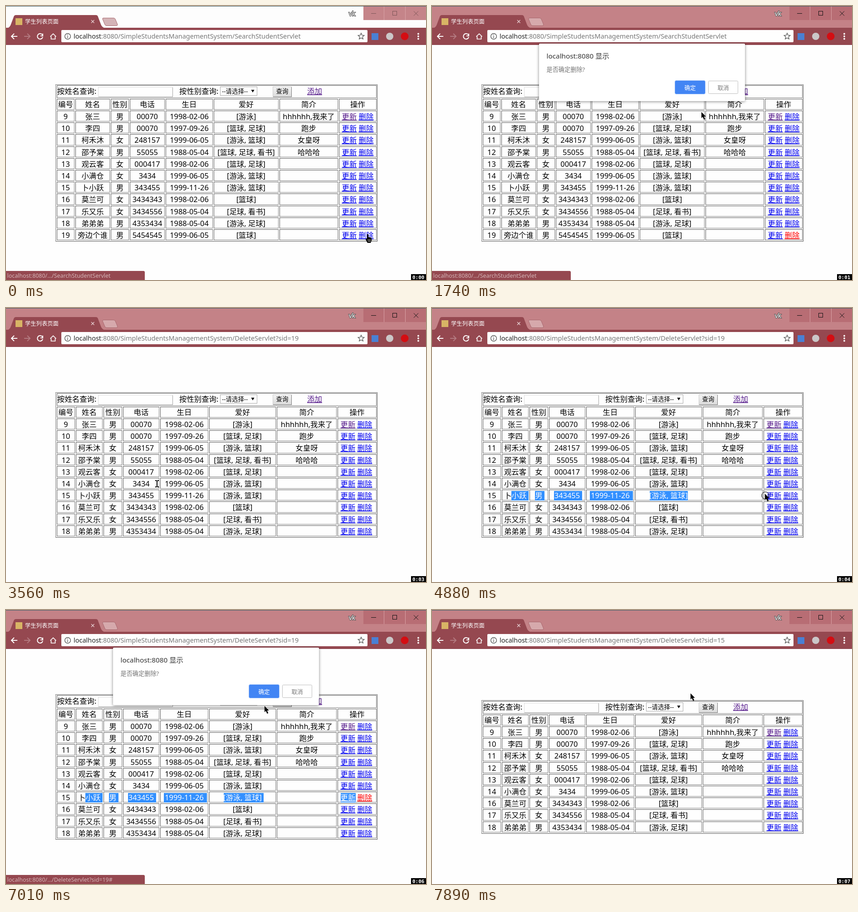
An HTML page for the animation above (8000 ms loop, 926x605 px).

```html
<!DOCTYPE html>
<html lang="zh-CN">
<head>
<meta charset="utf-8">
<title>学生列表页面</title>
<style>
html, body { margin: 0; width: 100%; height: 100%; overflow: hidden; background: #fefefe; }
svg { display: block; width: 926px; height: 605px; font: 16.4px "Noto Sans", "Noto Sans CJK SC", sans-serif; }
text { white-space: pre; }
.mid { text-anchor: middle; }
.link { fill: #00e; text-decoration: underline; }
.link.visited { fill: #551a8b; }
.link.active { fill: #f00; }
.crisp { shape-rendering: crispEdges; }
.icon { fill: none; stroke: #fff; stroke-width: 2; }
.small { font-size: 13.4px; }
.tab { font-size: 12.3px; fill: #fff; }
.url { font-size: 14.46px; fill: #777; }
.timer { font: bold 11px "DejaVu Sans Mono", monospace; fill: #fff; }
#dialog { filter: drop-shadow(0 1px 3px #0007); }
</style>
</head>
<body>
<svg viewBox="0 0 926 605">
  <defs>
    <linearGradient id="fade" gradientUnits="userSpaceOnUse" x1="158" x2="179">
      <stop stop-color="#fff"/><stop offset="1" stop-color="#fff" stop-opacity="0"/>
    </linearGradient>
    <linearGradient id="button" x2="0" y2="1">
      <stop stop-color="#f4f4f4"/><stop offset="1" stop-color="#dadada"/>
    </linearGradient>
    <clipPath id="dragged"><rect id="dragArea" x="175" y="400" width="0" height="30"/></clipPath>
  </defs>

  <rect width="926" height="605" fill="#fefefe"/>
  <g id="tables"></g>
  <g id="selection"></g>

  <!-- window frame -->
  <rect id="titlebar" width="926" height="48"/>
  <rect id="controls" x="788" y="1" width="138" height="30"/>
  <path d="M833.5 1V31M880.5 1V31" stroke="#d9a3a7" class="crisp"/>
  <rect width="926" height="1" fill="#40606a"/>
  <g id="controlIcons" fill="none" class="crisp">
    <path d="M805 16.5h11M852.5 11.5h9v9h-9z"/>
    <path d="M899 11.5l10 10M909 11.5l-10 10" shape-rendering="auto"/>
  </g>
  <text x="763" y="22" class="mid" font-size="14" fill="#fff" stroke="#555" stroke-width="2" paint-order="stroke">vk</text>
  <path d="M5 48Q9 46 11 40L17 24Q18 20 22 20H198Q202 20 203 24L209 40Q211 46 216 48V49H5z" fill="#954850"/>
  <path id="newTab" d="M215 26.5H237Q240 26.5 241 29L246 41Q246 43.500 243 43.500H222Q219 43.500 218 41L213 29Q212 26.500 215 26.500z" stroke="#a8686e"/>
  <rect y="48" width="926" height="38" fill="#954850"/>
  <rect y="85" width="926" height="1" fill="#87404a"/>
  <g id="tabReady">
    <rect x="21" y="27" width="15" height="15" fill="#d8b465"/>
    <text x="42" y="38.500" class="tab">学生列表页面</text>
    <path d="M80 63.500a6 6 0 1 0 1 5M81 61v5h-5" class="icon"/>
  </g>
  <g id="tabLoading">
    <path d="M29 30q1.500-1.500 4-1.500" class="icon"/>
    <text x="43" y="38.500" class="tab" fill="url(#fade)" style="fill:url(#fade)">localhost:8080/SimpleS</text>
    <path d="M69.500 61.500l11 11M80.500 61.500l-11 11" class="icon"/>
  </g>
  <path d="M188 31l6.500 6.500M194.500 31l-6.500 6.500" stroke="#e8d3d5" stroke-width="1.300"/>
  <path d="M25 67H12M18 61l-6 6 6 6" class="icon"/>
  <path d="M40 67H53M47 61l6 6-6 6" class="icon" style="stroke:#b37a80"/>
  <path d="M97.500 67.500L104 61.500l6.500 6M99.500 67v6h9v-6" class="icon" style="stroke-width:1.700"/>
  <rect x="122" y="53" width="675" height="27" rx="2" fill="#fefefe"/>
  <circle cx="136" cy="67" r="6.300" fill="none" stroke="#555" stroke-width="1.400"/>
  <path d="M136 63.500v1.500M136 66.500v4" stroke="#555" stroke-width="1.500"/>
  <text x="149" y="72" class="url"><tspan fill="#222">localhost</tspan><tspan id="urlPath"></tspan></text>
  <path d="M783 60l1.900 4.500 4.900.4-3.700 3.200 1.100 4.800-4.200-2.500-4.200 2.500 1.100-4.800-3.700-3.200 4.900-.4z" fill="none" stroke="#555" stroke-width="1.300"/>
  <rect x="806" y="60" width="15" height="15" fill="#4a80d4"/>
  <circle cx="846" cy="67" r="8" fill="#cbc7c8"/>
  <circle cx="879" cy="67" r="8.500" fill="#d40d12"/>
  <g fill="#fff"><circle cx="909" cy="61.500" r="1.900"/><circle cx="909" cy="67" r="1.900"/><circle cx="909" cy="72.500" r="1.900"/></g>

  <g id="dialog">
    <rect x="236" y="83" width="454" height="127" rx="2" fill="#fff"/>
    <text x="252.500" y="116" font-size="15.300" fill="#333">localhost:8080 显示</text>
    <text x="252.500" y="144.500" font-size="13.200" fill="#757575">是否确定删除?</text>
    <rect x="535.500" y="164.500" width="67" height="30" rx="3" fill="#4285f4" stroke="#a9c8fa"/>
    <rect x="609.500" y="165.500" width="65" height="28" rx="2" fill="#fff" stroke="#bdbdbd"/>
    <text x="569" y="185" class="mid" font-size="12.600" fill="#fff">确定</text>
    <text x="642" y="185" class="mid" font-size="12.600" fill="#757575">取消</text>
  </g>

  <g id="status">
    <path d="M0 585H303Q306 585 306 588V605H0z" fill="#954850"/>
    <text id="statusText" x="2.500" y="600" font-size="12.400" fill="#d6b5b8"></text>
  </g>

  <g id="pointer">
    <circle id="ring" cx="1" cy="4" r="8" fill="none" stroke="#000"/>
    <path id="arrow" d="M0 0V13.500L3 10.700 5.700 17 8.300 15.800 5.600 9.900H9.700z"/>
    <path id="beam" d="M-4-7H-1M1-7H4M0-7V7M-4 7H-1M1 7H4" stroke="#000" stroke-width="2"/>
    <g id="hand">
      <path d="M-1 0H2V6L9 8V14L7 19H0L-4 12-3 9-1 10z"/>
      <path d="M0 12.500H7M1 15.500H7" stroke="#ddd"/>
    </g>
  </g>
  <rect x="893" y="592" width="33" height="13"/>
  <text id="timer" x="896" y="602.500" class="timer"></text>
</svg>

<script>
const LOOP = 8000;
const $ = id => document.getElementById(id);
const show = (id, on) => $(id).style.display = on ? '' : 'none';

const students = [
  [9, '张三', '男', '00070', '1998-02-06', '[游泳]', 'hhhhhh,我来了'],
  [10, '李四', '男', '00070', '1997-09-26', '[篮球, 足球]', '跑步'],
  [11, '柯禾沐', '女', '248157', '1999-06-05', '[游泳, 篮球]', '女皇呀'],
  [12, '邵予棠', '男', '55055', '1988-05-04', '[篮球, 足球, 看书]', '哈哈哈'],
  [13, '观云客', '女', '000417', '1998-02-06', '[篮球, 足球]', ''],
  [14, '小满仓', '女', '3434', '1999-06-05', '[游泳, 篮球]', ''],
  [15, '卜小跃', '男', '343455', '1999-11-26', '[游泳, 篮球]', ''],
  [16, '莫兰可', '女', '3434343', '1998-02-06', '[篮球]', ''],
  [17, '乐又乐', '女', '3434556', '1988-05-04', '[足球, 看书]', ''],
  [18, '弟弟弟', '男', '4353434', '1988-05-04', '[游泳, 足球]', ''],
  [19, '旁边个谁', '男', '5454545', '1999-06-05', '[篮球]', '']
];
const headings = ['编号', '姓名', '性别', '电话', '生日', '爱好', '简介', '操作'];
const wideColumns = [112, 153, 231, 273, 352, 458, 603, 734, 819];
const slimColumns = [112, 154, 215, 258, 340, 448, 597, 731, 819];

const text = (x, y, s, attrs = '') => `<text x="${x}" y="${y}" ${attrs}>${s}</text>`;
const centred = (x, y, s) => text(x, y, s, 'class="mid"');

// Bevelled outline with its top-left and bottom-right sides in two greys.
function bevel(l, t, r, b, light, dark) {
  return `<g class="crisp" fill="none"><path d="M${l + .5} ${b}V${t + .5}H${r}" stroke="${light}"/>
    <path d="M${l + 1} ${b - .5}H${r - .5}V${t + 1}" stroke="${dark}"/></g>`;
}
const cell = (l, t, r, b) => bevel(l, t, r, b, '#555', '#808080');

function searchRow(top) {
  const base = top + 21;
  return cell(112, top + 2, 817, top + 30)
    + text(113, base, '按姓名查询:') + text(382, base, '按性别查询:')
    + bevel(203, top + 6, 368, top + 28, '#ddd', '#a0a0a0')
    + bevel(472, top + 5, 554, top + 25, '#a9a9a9', '#a9a9a9')
    + text(476, base - 1, '--请选择--', 'class="small"')
    + `<path d="M540.500 ${top + 12}h7l-3.500 6z"/>`
    + `<rect x="588" y="${top + 5}" width="42" height="23" fill="url(#button)"/>`
    + bevel(588, top + 5, 630, top + 28, '#ccc', '#777')
    + text(595.5, base - 1, '查询', 'class="small"')
    + text(664, base, '添加', 'class="link visited"');
}

function table(id, top, columns, rows) {
  const middle = i => (columns[i] + columns[i + 1] - 2) / 2;
  const rowTop = i => Math.round(top + 58 + 26.2 * i);
  const cells = (t, b) => columns.slice(0, -1).map((l, i) => cell(l, t, columns[i + 1] - 2, b)).join('');
  let out = bevel(109, top, 819, rowTop(rows.length) + 1, '#808080', '#555') + searchRow(top)
    + cells(top + 32, top + 56) + headings.map((h, i) => centred(middle(i), top + 50, h)).join('');
  rows.forEach((row, i) => {
    const base = top + 77 + 26.2 * i, x = columns[7] + 6.5;
    out += cells(rowTop(i), rowTop(i + 1) - 2)
      + row.map((s, c) => centred(middle(c), base, s)).join('')
      + text(x, base, '更新', `class="link ${i ? '' : 'visited'}"`)
      + text(x + 37, base, '删除', `class="link" id="${id}-${row[0]}"`);
  });
  return `<g id="${id}">${out}</g>`;
}

const without = (...ids) => students.filter(s => !ids.includes(s[0]));
$('tables').innerHTML = table('full', 173, wideColumns, students)
  + table('shorter', 186, slimColumns, without(19))
  + table('shortest', 199, slimColumns, without(15, 19));

const mark = (l, r) => `<rect x="${l}" y="404" width="${r - l}" height="21" fill="#3390ff"/>`;
const base15 = 420.2;
$('selection').innerHTML = `<g clip-path="url(#dragged)" fill="#fff">
  ${mark(175, 213)}${mark(227, 248)}${mark(269, 331)}${mark(348, 443)}${mark(480, 564)}
  ${text(175.6, base15, '小跃')}${centred(235.5, base15, '男')}${centred(298, base15, '343455')}
  ${centred(393, base15, '1999-11-26')}${centred(521.5, base15, '[游泳, 篮球]')}</g>
  <g id="selectedEnd">${mark(564, 568)}${mark(738, 771)}
  ${text(737.5, base15, '更新', 'class="link" style="fill:#fff"')}</g>`;

const bursts = [[530, 1470, 8], [1590, 2530, 8], [2650, 3560, 8], [3710, 4610, 8],
  [4760, 5520, 7], [5800, 6740, 8], [6860, 7890, 9]];
const ticks = [0, ...bursts.flatMap(([a, b, n]) =>
  Array.from({ length: n }, (_, k) => a + Math.floor((b - a) * k / (n - 1) / 10) * 10))];

// [time, x, y]
const route = [[0, 797, 504], [940, 797, 504], [1860, 557, 185], [2650, 557, 185], [3560, 333, 388],
  [4110, 176, 414], [4240, 176, 414], [4490, 320, 414], [4880, 734, 410], [5010, 765, 410],
  [5270, 794, 409], [6060, 794, 409], [6740, 570, 228], [6980, 570, 212], [7240, 570, 184], [LOOP, 570, 184]];
const shapes = [[0, 'hand'], [1060, 'arrow'], [3310, 'beam'], [4760, 'arrow'], [5140, 'hand'], [6200, 'arrow']];
const presses = [[530, 660], [1990, 2120], [4240, 5010], [5800, 5930], [7370, 7500]];
// [time, opacity, vertical shift]
const dialogSteps = [[0, 0, 0], [660, .6, -5], [790, 1, 0], [2120, .5, -8], [2260, .03, -18], [2390, 0, 0],
  [5930, .6, -5], [6060, 1, 0], [7500, .5, -8], [7630, .03, -18], [7760, 0, 0]];

const latest = (list, t) => list.filter(e => e[0] <= t).pop();
const within = (t, a, b) => t >= a && t < b;

function position(t) {
  const i = route.findIndex(p => p[0] > t);
  const [t0, x0, y0] = route[i - 1], [t1, x1, y1] = route[i];
  const k = (t - t0) / (t1 - t0);
  return [x0 + (x1 - x0) * k, y0 + (y1 - y0) * k];
}

function draw(t) {
  const active = t >= 530;
  $('titlebar').setAttribute('fill', active ? '#c48287' : '#fdfdfd');
  $('controls').setAttribute('fill', active ? '#b86d74' : '#c58489');
  $('controlIcons').setAttribute('stroke', active ? '#111' : '#7d5558');
  $('newTab').setAttribute('fill', active ? '#d6a9ac' : '#d4b4b7');

  const loading = within(t, 2260, 2390) || within(t, 7630, 7760);
  show('tabReady', !loading);
  show('tabLoading', loading);
  const page = t < 2260 ? 'SearchStudentServlet' : 'DeleteServlet?sid=' + (t < 7630 ? 19 : 15);
  $('urlPath').textContent = ':8080/SimpleStudentsManagementSystem/' + page;

  show('full', t < 2390);
  show('shorter', within(t, 2390, 7760));
  show('shortest', t >= 7760);
  $('full-19').classList.toggle('active', within(t, 530, 2260));
  $('shorter-15').classList.toggle('active', within(t, 5800, 7630));

  show('status', t < 2120 || within(t, 5270, 7500));
  $('statusText').textContent = 'localhost:8080/.../' + (t < 2260 ? 'SearchStudentServlet' : 'DeleteServlet?sid=19#');

  const [, opacity, shift] = latest(dialogSteps, t);
  $('dialog').setAttribute('opacity', opacity);
  $('dialog').setAttribute('transform', `translate(0 ${shift})`);

  const [x, y] = position(t);
  $('pointer').setAttribute('transform', `translate(${Math.round(x)} ${Math.round(y)})`);
  const shape = latest(shapes, t)[1];
  ['arrow', 'beam', 'hand'].forEach(s => show(s, s === shape));
  show('ring', presses.some(([a, b]) => within(t, a, b)));

  show('selection', within(t, 4240, 7760));
  show('selectedEnd', t >= 5010);
  $('dragArea').setAttribute('width', t < 5010 ? Math.max(0, x - 175) : 640);
  $('timer').textContent = '0:0' + Math.max(0, Math.floor((t - 60) / 1000));
}

function play() {
  const now = performance.now() % LOOP;
  draw(ticks.filter(t => t <= now).pop());
  requestAnimationFrame(play);
}
play();
</script>
</body>
</html>
```
